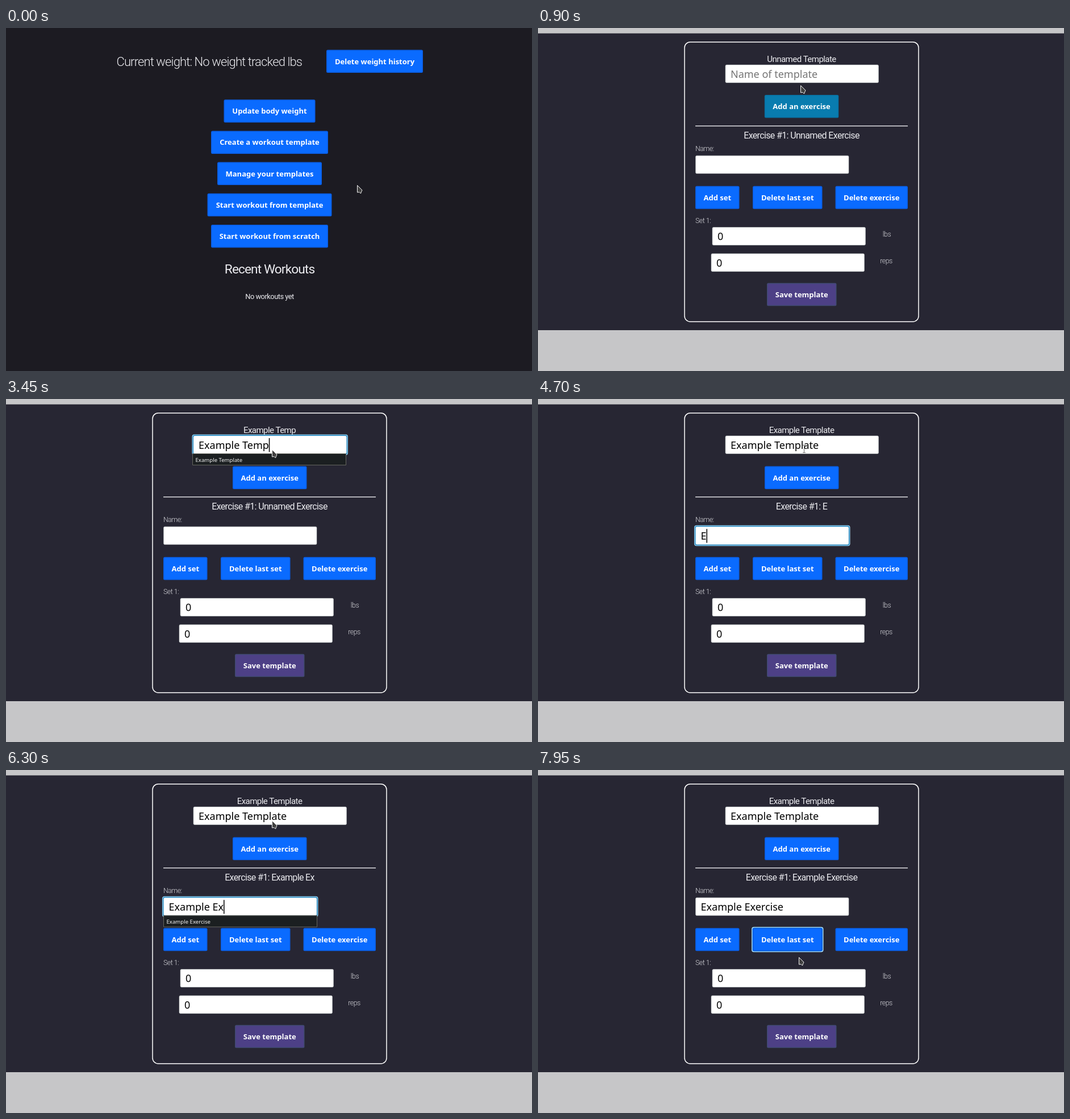
Recreate the animation shown at these times as an HTML page with a canvas. Size 926 px wide and 605 px high, loop 8 s.

```html
<!DOCTYPE html>
<html lang="en">
<head>
<meta charset="utf-8">
<title>Workout tracker</title>
<style>
  html, body { margin: 0; width: 100%; height: 100%; overflow: hidden; background: #1c1b22; }
  canvas { display: block; width: 926px; height: 605px; }
</style>
</head>
<body>
<canvas id="stage" width="926" height="605"></canvas>
<script>
const LOOP = 8000, STEP = 50, MODAL_OPENS = 650;
const BLUE = [10, 107, 255], GREEN = [6, 158, 16];
const HEADING = 'Roboto, sans-serif', BODY = '"Noto Sans", "Open Sans", sans-serif';
const TEMPLATE = 'Example Template', EXERCISE = 'Example Exercise';
const TEMPLATE_KEYS = [1750, 1850, 1950, 2050, 2250, 2300, 2400, 2500,
                       3050, 3200, 3250, 3400, 3500, 3500, 3550, 3550];
const EXERCISE_KEYS = [4700, 4850, 4950, 5100, 5250, 5300, 5350, 5950,
                       6100, 6300, 6500, 6650, 6800, 6900, 7000, 7050];

// Pointer path as [time, x, y]
const POINTER = [
  [50, 618, 277], [350, 546, 223], [500, 525, 209], [650, 523, 206], [750, 508, 168],
  [850, 474, 122], [900, 462, 101], [1000, 465, 92], [1100, 468, 89],
  [7700, 468, 89], [7750, 463, 89], [7850, 463, 89], [7900, 459, 330], [8000, 459, 330]
];
const CREATE_HOVER = [[300, 0], [450, 1], [650, 1]];
const ADD_HOVER = [[750, 0], [850, .5], [1000, 0]];

const ctx = document.getElementById('stage').getContext('2d');
const clamp = v => Math.max(0, Math.min(1, v));
const mix = (a, b, k) => a + (b - a) * k;
const during = (t, from, to) => t >= from && t < to;

function track(points, t) {
  if (t <= points[0][0]) return points[0].slice(1);
  for (let i = 1; i < points.length; i++) {
    const [a, ...from] = points[i - 1], [b, ...to] = points[i];
    if (t <= b) return from.map((v, j) => mix(v, to[j], (t - a) / (b - a)));
  }
  return points[points.length - 1].slice(1);
}

// Focus level: fades in and out over two steps
const focus = (t, from, to) =>
  clamp((t - from + STEP) / 100) * (1 - clamp((t - to + STEP) / 100));

const typed = (text, keys, t) => text.slice(0, keys.filter(k => k <= t).length);

function box(x, y, w, h, r, fill, stroke, line = 1) {
  ctx.beginPath();
  ctx.roundRect(x, y, w, h, r);
  if (fill) { ctx.fillStyle = fill; ctx.fill(); }
  if (stroke) { ctx.strokeStyle = stroke; ctx.lineWidth = line; ctx.stroke(); }
}

function text(str, x, y, font, color, align = 'left', spacing = 0) {
  ctx.font = font;
  ctx.letterSpacing = spacing + 'px';
  ctx.fillStyle = color;
  ctx.textAlign = align;
  ctx.fillText(str, x, y);
}

const heading = (str, x, y, size, align = 'center', weight = 400, color = '#ececf0') =>
  text(str, x, y, `${weight} ${size}px ${HEADING}`, color, align, -.04 * size);

const label = (str, x, y, align) => heading(str, x, y, 12.3, align, 300, '#d5d5da');

function button(str, x, y, w, { hover = 0, ring = 0, fill, edge } = {}) {
  const h = 40.5;
  x -= .6 * hover;
  y -= 1.4 * hover;
  const rgb = BLUE.map((v, i) => mix(v, GREEN[i], hover));
  const shade = rgb.map((v, i) => mix(v * [1, .88, .9][i], v, hover));
  if (ring) {
    ctx.globalAlpha = ring;
    box(x - 2, y - 2, w + 4, h + 4, 4, '#a5d8f5');
    box(x - .5, y - .5, w + 1, h + 1, 3, '#0b66c8');
    ctx.globalAlpha = 1;
  }
  box(x, y, w, h, 2.5, edge || `rgb(${shade})`);
  box(x + 1.5, y + 1.5, w - 3, h - 3, 1.5, fill || `rgb(${rgb})`);
  text(str, x + w / 2, y + 25, `700 13px ${BODY}`, '#fff', 'center');
}

function field(value, x, y, { ring = 0, caret = false, hint = '' } = {}) {
  const w = 269.5, h = 31.5, font = `18px ${BODY}`;
  if (ring) {
    ctx.globalAlpha = ring;
    box(x - 2.5, y - 2.5, w + 5, h + 5, 4, '#94d2f2');
    box(x - 1.2, y - 1.2, w + 2.4, h + 2.4, 3, '#1178b4');
    ctx.globalAlpha = 1;
  }
  box(x, y, w, h, 2, '#fff', ring ? null : '#b9bfc0', .6);
  text(value || hint, x + 9, y + 22.5, font, value ? '#000' : '#757575');
  if (caret) {
    ctx.fillStyle = '#000';
    ctx.fillRect(x + 9 + (value ? ctx.measureText(value).width : 0), y + 4, 1.5, 24.5);
  }
}

function suggestion(str, x, y) {
  box(x, y, 270, 20, 0, '#1b1f21', '#65665f');
  text(str, x + 5, y + 14.2, `9.6px ${BODY}`, '#f4f4f4');
}

function drawHome(t) {
  heading('Current weight: No weight tracked lbs', 194.5, 67, 22, 'left', 300);
  button('Delete weight history', 564, 38.5, 170);
  const rows = [['Update body weight', 161], ['Create a workout template', 206],
    ['Manage your templates', 184], ['Start workout from template', 219],
    ['Start workout from scratch', 206]];
  rows.forEach(([name, w], i) => button(name, 464 - w / 2, 126.2 + i * 55.2, w,
    { hover: i === 1 ? track(CREATE_HOVER, t)[0] : 0 }));
  heading('Recent Workouts', 464, 432.5, 22.7);
  heading('No workouts yet', 464, 478, 12.9);
}

function drawModal(t) {
  const name = typed(TEMPLATE, TEMPLATE_KEYS, t);
  const exercise = typed(EXERCISE, EXERCISE_KEYS, t);
  ctx.fillStyle = '#c6c6c8';
  ctx.fillRect(0, 0, 926, 605);
  ctx.fillStyle = '#272633';
  ctx.fillRect(0, 9.5, 926, 523.5);
  box(258, 24.7, 412, 493.3, 10, null, '#fff', 1.5);

  heading(name.trim() || 'Unnamed Template', 464, 60, 15.1);
  field(name, 330, 65, { ring: focus(t, 1100, 3800), caret: during(t, 1100, 3800),
    hint: 'Name of template' });
  button('Add an exercise', 399, 118.5, 130.5,
    { hover: track(ADD_HOVER, t)[0], ring: focus(t, 3800, 4100) });
  if (during(t, 1800, 3800)) suggestion(TEMPLATE, 328.5, 96.5);

  ctx.fillStyle = '#dedee2';
  ctx.fillRect(277, 172, 374, 1.5);
  heading(`Exercise #1: ${exercise.trim() || 'Unnamed Exercise'}`, 464, 195.3, 16);
  label('Name:', 277, 217, 'left');
  field(exercise, 277.5, 225.2, { ring: focus(t, 4100, 7500), caret: during(t, 4100, 7500) });

  button('Add set', 277, 278.7, 77.5, { ring: focus(t, 7500, 7900) });
  button('Delete last set', 378, 278.7, 122.5, { ring: focus(t, 7900, 9000) });
  button('Delete exercise', 523.5, 278.7, 127.5);
  if (during(t, 4750, 7500)) suggestion(EXERCISE, 277.5, 256.8);

  label('Set 1:', 277, 343.5, 'left');
  field('0', 307, 351.5);
  label('lbs', 614, 368);
  field('0', 305, 398);
  label('reps', 613, 414.5);
  button('Save template', 403, 449.8, 122.5, { fill: '#4d4086', edge: '#414a73' });
}

function drawPointer(t) {
  const [x, y] = track(POINTER, t);
  const overText = during(t, 950, 1800) || during(t, 3800, 4750) || during(t, 7500, 7900);
  ctx.beginPath();
  ctx.lineWidth = 1;
  if (overText) {
    for (const [x1, y1, x2, y2] of [[0, -7, 0, 6], [-2.5, -7, 2.5, -7], [-2.5, 6, 2.5, 6]]) {
      ctx.moveTo(x + .5 + x1, y - .5 + y1);
      ctx.lineTo(x + .5 + x2, y - .5 + y2);
    }
    ctx.strokeStyle = '#777';
  } else {
    for (const [dx, dy] of [[0, 0], [0, 12.5], [3.5, 12], [6, 14.5], [7, 11.5], [8.5, 8.5]])
      ctx.lineTo(x + .5 + dx, y + .5 + dy);
    ctx.closePath();
    ctx.fillStyle = '#414141';
    ctx.fill();
    ctx.strokeStyle = '#f2f2f2';
  }
  ctx.stroke();
}

function draw(now) {
  const t = Math.floor((now % LOOP) / STEP) * STEP;
  ctx.fillStyle = '#1c1b22';
  ctx.fillRect(0, 0, 926, 605);
  (t < MODAL_OPENS ? drawHome : drawModal)(t);
  drawPointer(t);
}

let start;
function tick(now) {
  start ??= now;
  draw(now - start);
  requestAnimationFrame(tick);
}
draw(0);
requestAnimationFrame(tick);
</script>
</body>
</html>
```
